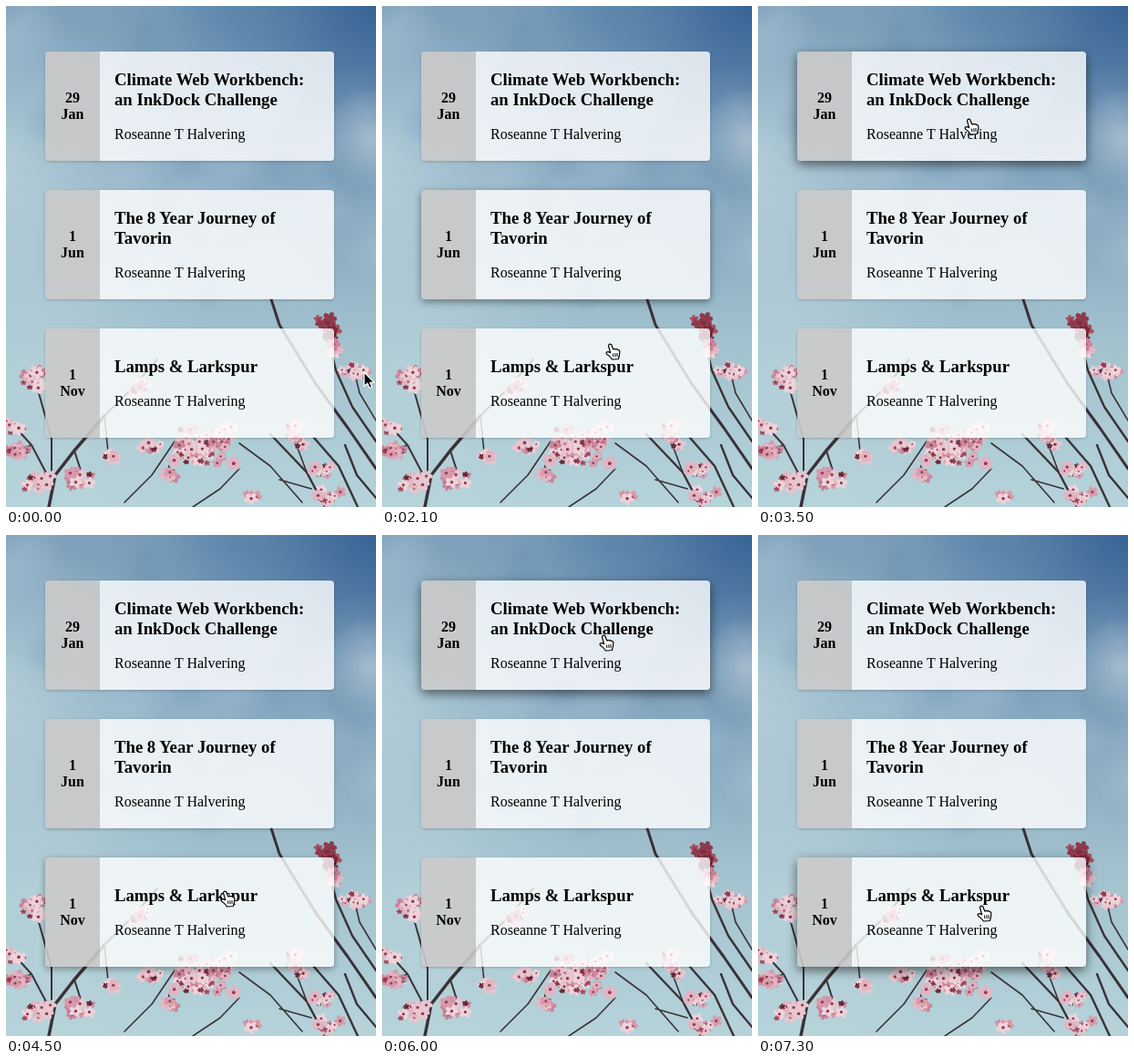
Recreate the animation shown at these times as an HTML page with a canvas. Size 406x550 px, loop 7400 ms.

```html
<!DOCTYPE html>
<html lang="en">
<head>
<meta charset="utf-8">
<title>Event cards</title>
<style>
  html, body { margin: 0; width: 100%; height: 100%; overflow: hidden; background: #a9c6d2; }
  body { position: relative; font: 16px/18px "Liberation Serif", Times, serif; color: #000; }
  canvas, svg { position: absolute; left: 0; top: 0; }
  .card { position: absolute; left: 43px; width: 317px; height: 120px; display: flex;
    border-radius: 4px; background: linear-gradient(to right, transparent 60px, rgba(255,255,255,.8) 60px); }
  .date { width: 60px; display: flex; align-items: center; justify-content: center; text-align: center;
    font-weight: bold; background: rgba(203,202,202,.9); border-radius: 4px 0 0 4px; }
  .info { flex: 1; padding-left: 16px; display: flex; flex-direction: column; justify-content: center; white-space: nowrap; }
  h3 { margin: 0 0 18px; font-size: 18.72px; line-height: 22px; }
  p { margin: 0; }
</style>
</head>
<body>
<canvas id="sky" width="406" height="550"></canvas>

<div class="card" style="top:50px">
  <div class="date">29<br>Jan</div>
  <div class="info"><h3>Climate Web Workbench:<br>an InkDock Challenge</h3><p>Roseanne T Halvering</p></div>
</div>
<div class="card" style="top:202px">
  <div class="date">1<br>Jun</div>
  <div class="info"><h3>The 8 Year Journey of<br>Tavorin</h3><p>Roseanne T Halvering</p></div>
</div>
<div class="card" style="top:353.5px">
  <div class="date">1<br>Nov</div>
  <div class="info"><h3>Lamps &amp; Larkspur</h3><p>Roseanne T Halvering</p></div>
</div>

<svg width="406" height="550">
  <g id="cursor" stroke-linejoin="round">
    <path id="arrow" d="M0 0V15.5L3.6 12.2L6 17.6L8.6 16.5L6.2 11.3H11Z" fill="#000" stroke="#fff" stroke-width="1.2"/>
    <g id="hand" fill="#fff" stroke="#000" stroke-width="1.2">
      <path d="M-2.5 2Q-2 -.7 .6 .6L2.8 6Q4.4 4.6 5.4 6Q7 5 7.8 6.6Q9.8 6.2 9.8 8.6Q10 12 8.4 16.5L1.5 17Q-.5 13.5-4.6 11Q-5.6 8.4-2.6 8.6L-.3 9.7Z"/>
      <path d="M2.5 10.5l.4 3.6M4.8 10.2l.3 3.8M7 10l.1 3.8" fill="none" stroke-width="1"/>
    </g>
  </g>
</svg>

<script>
const LOOP = 7400, STEP = 100, FADE = 300, LAG = 80;
const byId = id => document.getElementById(id);
const cards = [...document.querySelectorAll('.card')];
const cardTops = [50, 202, 353.5];

// Background: soft sky, bare branches, blossom clusters
const ctx = byId('sky').getContext('2d');
let seed = 11;
const random = () => (seed = (seed * 16807) % 2147483647) / 2147483647;
const spread = () => random() + random() - 1;
const pick = list => list[Math.floor(random() * list.length)];

function drawSky() {
  const base = ctx.createLinearGradient(0, 0, 0, 550);
  ['#7c9fba', '#89abc3', '#96b6c8', '#a6c6d1', '#b6d3da'].forEach((c, i) => base.addColorStop(i / 4, c));
  ctx.fillStyle = base;
  ctx.fillRect(0, 0, 406, 550);
  glow(406, 0, 230, '38,84,140', .8);
  glow(230, 0, 120, '85,130,170', .4);
  glow(0, 190, 190, '190,214,222', .75);
  glow(0, 30, 70, '165,194,209', .4);
  glow(400, 145, 55, '178,197,211', .75);
  glow(390, 255, 90, '120,155,183', .35);
  glow(300, 185, 100, '115,152,182', .35);
  glow(30, 400, 200, '190,214,220', .6);
  for (let i = 0; i < 40; i++) {
    glow(random() * 406, random() * 340, 20 + random() * 30, pick(['205,222,230', '80,122,160']), .12);
  }
}

function glow(x, y, r, rgb, alpha) {
  const g = ctx.createRadialGradient(x, y, 0, x, y, r);
  g.addColorStop(0, `rgba(${rgb},${alpha})`);
  g.addColorStop(1, `rgba(${rgb},0)`);
  ctx.fillStyle = g;
  ctx.fillRect(0, 0, 406, 550);
}

function branch(width, d) {
  ctx.strokeStyle = '#3a3236';
  ctx.lineWidth = width;
  ctx.lineCap = ctx.lineJoin = 'round';
  ctx.stroke(new Path2D(d));
}

const PINKS = ['#eed3da', '#e3b4c1', '#d899ab', '#c98499', '#e8c6cf'];
const REDS = ['#7d2a3c', '#8d3a4c', '#5c2430', '#a85064'];

function flower(x, y, size, color) {
  const turn = random() * 6, tilt = .6 + random() * .4;
  ctx.fillStyle = color;
  for (let i = 0; i < 5; i++) {
    const a = turn + i * Math.PI * .4;
    ctx.beginPath();
    ctx.ellipse(x + Math.cos(a) * size * .6, y + Math.sin(a) * size * .6 * tilt, size * .55, size * .38, a, 0, 7);
    ctx.fill();
  }
  ctx.fillStyle = '#8c3a50';
  ctx.beginPath();
  ctx.arc(x, y, size * .25, 0, 7);
  ctx.fill();
}

function blossom(x, y, rx, ry, colors = PINKS) {
  for (let i = 0; i < rx * ry / 22 + 3; i++) {
    const fx = x + spread() * rx, fy = y + spread() * ry;
    flower(fx, fy, 4 + random() * 3.5, pick(colors));
    if (i % 3 === 0) flower(x + spread() * rx, y + spread() * ry, 3, pick(REDS));
  }
}

function drawTree() {
  branch(3.5, 'M47 550L54 515L75 488L108 450');
  branch(2, 'M108 450L138 420L166 388M50 530L50 475L36 425M48 520L28 482L8 460M75 488L82 510');
  branch(1.6, 'M130 545L160 515L185 478M205 550L235 530L256 508M180 500L176 520M108 450L112 490M28 482L10 488');
  branch(3, 'M291 322L300 350L340 415L375 463L406 508');
  branch(2.4, 'M290 470L330 512L350 550M338 474L365 505L386 550');
  branch(2.4, 'M406 478L380 440L362 400L352 360M372 482L385 515L406 540');
  branch(1.6, 'M406 455L388 425L382 400M330 512L318 480M300 520L335 530M256 480L290 505L325 545');
  blossom(31, 408, 14, 18);
  blossom(12, 463, 14, 8);
  blossom(14, 488, 15, 6);
  blossom(33, 523, 17, 12);
  blossom(78, 519, 21, 12);
  blossom(114, 494, 9, 6);
  blossom(181, 514, 6, 8);
  blossom(150, 420, 12, 9);
  blossom(217, 484, 42, 27);
  blossom(160, 484, 14, 7);
  blossom(317, 470, 11, 17);
  blossom(352, 356, 15, 16, REDS);
  blossom(363, 378, 8, 12);
  blossom(384, 402, 21, 10);
  blossom(345, 510, 16, 8);
  blossom(350, 538, 18, 9);
  blossom(270, 538, 8, 5);
}

// Pointer path: time, x, y
const PATH = [
  [0, 393, 402], [400, 348, 270], [850, 292, 118], [1300, 277, 161], [2100, 251, 371],
  [2450, 246, 415], [2850, 238, 270], [3200, 233, 112], [3500, 232, 124], [3950, 236, 275], [4500, 241, 391],
  [4900, 244, 423], [5350, 244, 260], [5700, 243, 108], [6000, 244, 110], [6900, 246, 388], [7300, 246, 407]
];

function slope(i, axis) {
  const a = PATH[i - 1], b = PATH[i + 1];
  return a && b ? (b[axis] - a[axis]) / (b[0] - a[0]) : 0;
}

function pointerAt(time) {
  const t = Math.min(Math.max(time, 0), 7300);
  const i = Math.max(0, PATH.findIndex(p => p[0] >= t) - 1);
  const a = PATH[i], b = PATH[i + 1], span = b[0] - a[0], u = (t - a[0]) / span;
  return [1, 2].map(k =>
    a[k] + (b[k] - a[k]) * u * u * (3 - 2 * u) +
    span * u * (1 - u) * (slope(i, k) * (1 - u) - slope(i + 1, k) * u));
}

function hoveredCard(time) {
  const [x, y] = pointerAt(time);
  return x < 43 || x > 360 ? -1 : cardTops.findIndex(top => y >= top && y <= top + 120);
}

// Share of the recent past during which a card was hovered
function lift(card, time) {
  const samples = 20;
  let hits = 0;
  for (let i = 0; i < samples; i++) {
    if (hoveredCard(time - LAG - i * FADE / samples) === card) hits++;
  }
  return hits / samples;
}

function render(time) {
  const [x, y] = pointerAt(time);
  const over = hoveredCard(time) >= 0;
  byId('cursor').setAttribute('transform', `translate(${Math.round(x)} ${Math.round(y)})`);
  byId('hand').style.display = over ? '' : 'none';
  byId('arrow').style.display = over ? 'none' : '';
  cards.forEach((card, i) => {
    const k = lift(i, time);
    card.style.boxShadow = `0 ${1 + 3 * k}px ${3 + 9 * k}px rgba(0,0,0,${.22 + .33 * k})`;
  });
}

function tick() {
  render(Math.floor(performance.now() % LOOP / STEP) * STEP);
  requestAnimationFrame(tick);
}

drawSky();
drawTree();
tick();
</script>
</body>
</html>
```
